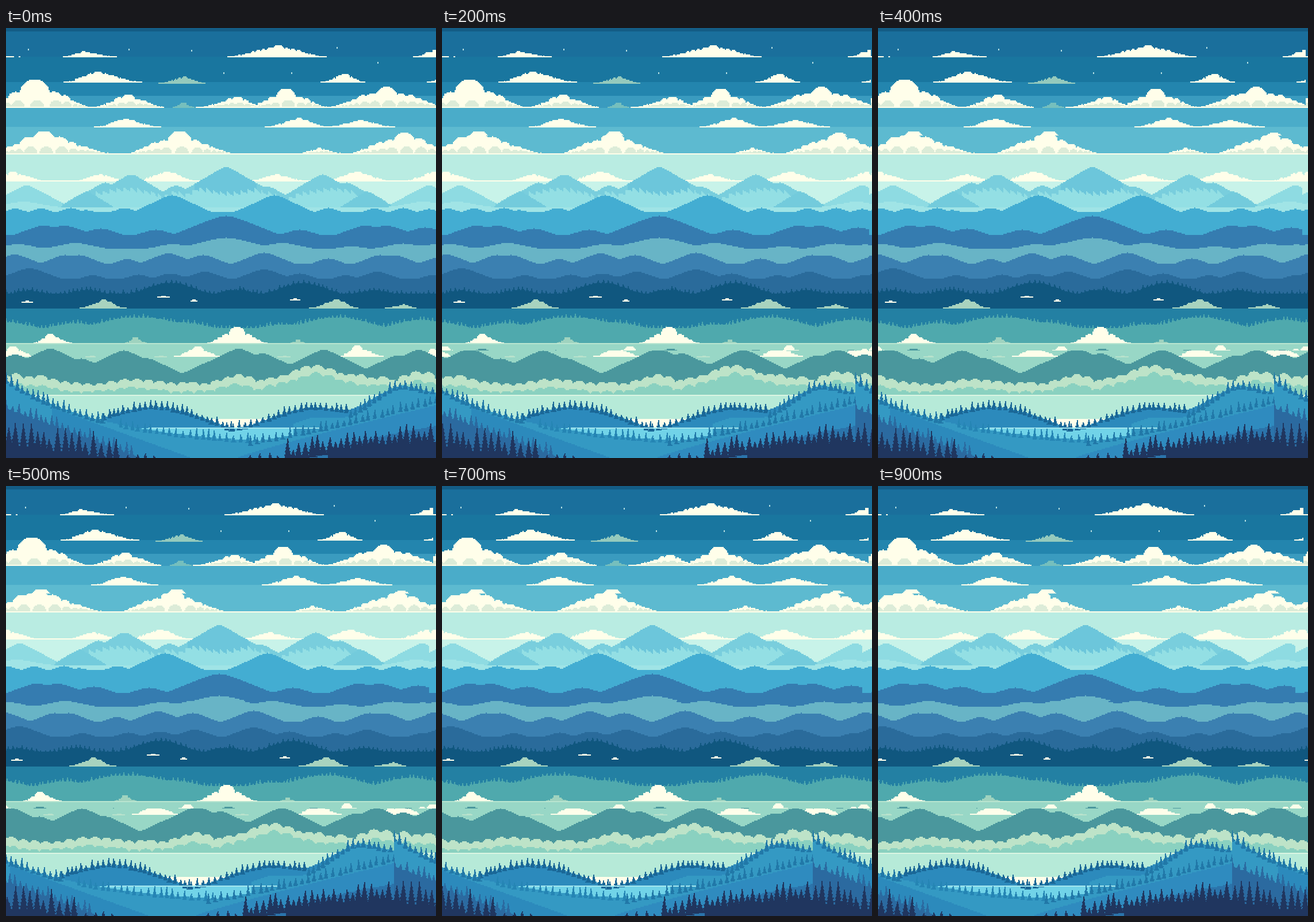
An HTML page with a canvas that plays this animation: 748x748 px, repeating every 1 s.

```html
<!DOCTYPE html>
<html>
<head>
<meta charset="utf-8">
<title>Parallax hills</title>
<style>
html, body { margin: 0; width: 100%; height: 100%; overflow: hidden; background: #1a6f9c; }
canvas { display: block; width: 100vw; height: 100vh; }
</style>
</head>
<body>
<canvas id="stage" width="748" height="748"></canvas>
<script>
const S = 748, P = 2, CREAM = '#fffeea', SHADE = '#dcecd8';
const view = document.getElementById('stage').getContext('2d');
const scene = document.createElement('canvas');
scene.width = scene.height = S;
const g = scene.getContext('2d');

let seed = 7;
const rnd = () => (seed = (seed * 16807) % 2147483647) / 2147483647;
const snap = v => Math.round(v / P) * P;

function box(color, x, y, w, h) {
  g.fillStyle = color;
  g.fillRect(Math.round(x), Math.round(y), Math.round(w), Math.round(h));
}

// Skyline of rounded tents standing on a base: peaks are x,top pairs
function peaks(base, slope, round, list) {
  const soft = 1.5;
  return x => {
    let sum = Math.exp(-base / soft);
    for (let i = 0; i < list.length; i += 2)
      sum += Math.exp(-(list[i + 1] + slope * (Math.hypot(x - list[i], round) - round)) / soft);
    return -soft * Math.log(sum);
  };
}

// Eased line through a few x,y pairs
const glide = p => x => {
  let i = 0;
  while (i < p.length - 4 && x > p[i + 2]) i += 2;
  const t = Math.min(1, Math.max(0, (x - p[i]) / (p[i + 2] - p[i])));
  return p[i + 1] + (p[i + 3] - p[i + 1]) * (t + t * t * (3 - 2 * t)) / 2;
};

const rise = (x0, y0, height, power) => x => y0 - height * Math.max(0, (x - x0) / (S - x0)) ** power;

function ridge(color, bottom, y, x0 = 0, x1 = S) {
  for (let x = snap(x0); x < x1; x += P) {
    const top = snap(y(x));
    if (top < bottom) box(color, x, top, P, bottom - top);
  }
}

function tree(color, x, foot, h, w) {
  for (let i = 0; i < h; i += P) {
    const half = Math.max(1, w / 2 * (i + 2) / h * (i % 6 < 4 ? 0.85 : 1.15));
    box(color, x - half, foot - h + i, 2 * half, P);
  }
}

function trees(color, y, x0, x1, gap, h, w) {
  for (let x = x0; x < x1; x += gap * (0.8 + 0.4 * rnd()))
    tree(color, x, y(x) + 4, h * (0.65 + 0.7 * rnd()), w);
}

function puff(color, cx, top, r, base) {
  for (let x = snap(cx - r); x < cx + r; x += P) {
    const d = x + 1 - cx;
    if (Math.abs(d) > r) continue;
    const y = snap(top + r - Math.sqrt(r * r - d * d));
    if (y < base) box(color, x, y, P, base - y);
  }
}

// A tall puff with smaller ones falling away to both ends of a flat line
function cloud(base, cx, top, x0, x1, color = CREAM, shaded = false) {
  const H = base - top, lobes = [[cx, H]];
  for (const end of [x0, x1]) {
    const side = Math.sign(end - cx);
    let x = cx, h = H;
    while (true) {
      x += side * Math.max(6, h * 0.66);
      const t = (x - cx) / (end - cx);
      if (t > 0.9) break;
      h = H * (1 - t) ** 1.2 * (0.9 + 0.2 * rnd());
      lobes.push([x, h]);
    }
  }
  for (const [x, h] of lobes) puff(color, x, base - h, Math.max(4, h * 0.52), base);
  if (shaded)
    for (const [x, h] of lobes) {
      const s = Math.min(12, h * 0.4);
      puff(SHADE, x + 4, base - 2 - s, s, base - 2);
    }
  box(color, x0, base - 2, x1 - x0, 2);
}

function clouds(base, list, color, shaded) {
  list.forEach(c => cloud(base, ...c, color, shaded));
}

function sky() {
  [[0, '#145d86'], [6, '#1a6f9c'], [50, '#19769f'], [94, '#2385ae'], [118, '#3a9bbf'],
   [139, '#4aacc9'], [172, '#5dbad0'], [220, '#b9ece2'], [266, '#c8f3e9']]
    .forEach(([y, c]) => box(c, 0, y, S, S - y));
  [[38, 36], [213, 36], [322, 38], [575, 33], [646, 59], [378, 77], [496, 77]]
    .forEach(([x, y]) => box('#b5dfe2', x, y, 2, 3));
  clouds(51, [[135, 40, 99, 193], [474, 29, 385, 558], [748, 37, 708, 770]]);
  box(CREAM, 0, 49, 14, 2);
  box(CREAM, 22, 49, 3, 2);
  clouds(95, [[160, 75, 100, 237], [590, 79, 547, 625], [748, 90, 732, 770]]);
  clouds(97, [[311, 84, 265, 347]], '#95cabd');
  clouds(139, [[50, 89, -40, 150], [213, 115, 150, 275], [403, 119, 330, 450],
    [487, 105, 420, 560], [662, 102, 555, 775]], CREAM, true);
  clouds(139, [[309, 129, 290, 328]], '#76bfbd');
  clouds(173, [[209, 157, 153, 270], [510, 156, 450, 560], [617, 159, 557, 677]]);
  clouds(220, [[66, 179, -40, 185], [302, 179, 205, 400], [545, 208, 500, 590], [693, 182, 590, 800]], CREAM, true);
  box(CREAM, 0, 218, S, 2);
  clouds(267, [[12, 249, -40, 70], [165, 254, 115, 215], [280, 249, 225, 335], [472, 254, 415, 525],
    [612, 249, 550, 670], [746, 249, 690, 800]]);
  box(CREAM, 0, 265, S, 2);
}

function mountains() {
  ridge('#8edbe2', 330, peaks(308, 0.56, 8, [35, 274, 735, 274]));
  const alps = peaks(309, 0.6, 6, [140, 285, 172, 269, 217, 255, 295, 274, 350, 263, 382, 242,
    420, 265, 455, 276, 550, 255, 592, 269, 627, 285]);
  ridge('#79cedd', 330, alps, 97, 662);
  ridge('#6cc6db', 300, alps, 328, 436);
  ridge('#93dfe4', 330, x => Math.max(alps(x) + 8, 281 + 4 * Math.sin(x / 19)) + x % 12 * 0.7, 150, 612);
  const spurs = peaks(330, 0.62, 4, [140, 285, 627, 285]);
  ridge('#73cbdc', 330, spurs);
  ridge('#a0e4e6', 330, peaks(312, 0.2, 10, [30, 302, 725, 302]));

  ridge('#43add2', 390, peaks(320, 0.5, 9, [15, 314, 60, 314, 112, 313, 138, 317, 205, 313, 288, 291,
    420, 313, 466, 291, 560, 313, 640, 314, 690, 313, 735, 315]));
  ridge('#357cb0', 400, peaks(361, 0.42, 16, [65, 344, 100, 344, 164, 349, 260, 351, 382, 327,
    510, 351, 625, 344, 660, 344, 728, 347]));
  ridge('#68b4c6', 425, peaks(384, 0.26, 15, [20, 376, 120, 374, 290, 376, 382, 365, 480, 374, 600, 380, 690, 375, 748, 376]));
  ridge('#3b80b1', 450, peaks(411, 0.43, 10, [14, 394, 102, 395, 126, 395, 210, 402, 282, 392, 342, 395,
    448, 391, 560, 401, 650, 395, 675, 395, 748, 400]));
  ridge('#2a6b9b', 480, peaks(437, 0.4, 10, [40, 418, 150, 430, 230, 429, 285, 427, 345, 424, 448, 420,
    510, 427, 590, 430, 645, 424, 740, 430]));
  const wood = peaks(462, 0.42, 25, [40, 457, 140, 456, 285, 443, 400, 455, 515, 444, 640, 456]);
  ridge('#10577f', 488, wood);
  trees('#10577f', wood, 0, S, 8, 8, 7);
}

function lowland() {
  [[37, 478, 10], [274, 469, 11], [327, 476, 6], [503, 474, 9]]
    .forEach(([x, y, r]) => cloud(y, x, y - 4, x - r, x + r));
  clouds(488, [[170, 472, 128, 210], [575, 471, 527, 613], [692, 480, 659, 714]], '#a8d3bf');

  box('#2380a3', 0, 488, S, 62);
  const shore = peaks(523, 0.3, 30, [0, 512, 120, 514, 215, 504, 245, 504, 310, 513, 480, 516, 574, 503, 722, 508]);
  ridge('#4fa9ad', 550, shore);
  trees('#4fa9ad', shore, 0, S, 7, 8, 6);
  clouds(549, [[225, 537, 207, 245], [508, 541, 495, 520]], '#9fd3bf');
  clouds(549, [[77, 531, 48, 115], [402, 520, 350, 455]]);

  box('#98d7c6', 0, 550, S, 90);
  box('#b9e5d0', 0, 548, S, 2);
  clouds(573, [[150, 569, 138, 156], [270, 569, 258, 280], [485, 569, 472, 495]], '#b8e2cc');
  clouds(572, [[12, 553, -25, 51], [334, 553, 292, 374], [611, 552, 580, 657], [742, 558, 722, 770]]);
  ridge('#4a979d', 630, peaks(607, 0.5, 8, [15, 568, 76, 558, 130, 575, 204, 561, 245, 575, 350, 583,
    404, 558, 445, 566, 552, 560, 679, 570, 717, 560]));

  const mist = peaks(617, 0.4, 15, [15, 602, 60, 605, 215, 609, 245, 611, 400, 603, 480, 604, 537, 586, 600, 601, 650, 606, 720, 598]);
  for (const [color, drop] of [['#bde3c8', 0], ['#8ad1c0', 14]]) {
    ridge(color, 638, x => mist(x) + drop + 5);
    for (let x = 0; x < S + 20; x += 17 + 6 * rnd())
      puff(color, x, mist(x) + drop + 4 * rnd() - 2, 10 + 4 * rnd(), 638);
  }
  box('#b6ead8', 0, 638, S, 110);
  box('#daf5e2', 0, 638, S, 2);
}

function hills() {
  box(CREAM, 325, 680, 140, 16);
  box('#71d3e8', 180, 696, 400, 52);

  const back = peaks(700, 0.42, 60, [255, 659]);
  ridge('#2c8abc', 696, back, 110, 392);
  trees('#1a6797', back, 170, 400, 9, 13, 8);
  const east = glide([390, 698, 530, 659, 592, 665, 687, 622, 748, 634]);
  ridge('#2c8abc', 696, east, 392);
  trees('#1a6797', east, 395, 600, 9, 13, 8);
  const crest = x => east(x) + Math.max(0, 690 - x) * 0.12;
  ridge('#3499c3', 748, crest, 500);
  trees('#2178a8', crest, 600, S, 9, 15, 8);
  box('#a4e6ee', 248, 695, 297, 2);

  const west = x => 728 - 114 * Math.exp(-x / 180);
  ridge('#3499c3', 748, west, 0, 470);
  trees('#2178a8', west, 0, 170, 9, 15, 8);
  trees('#2585b4', west, 200, 450, 11, 14, 7);
  ridge('#2c8abc', 748, x => 632 + 0.36 * x, 80, 320);

  const slope = rise(400, 724, 76, 1.2);
  ridge('#3499c3', 748, slope, 400);
  trees('#2178a8', slope, 425, S, 11, 13, 7);
  ridge('#2f8bbf', 748, rise(400, 748, 92, 0.9), 400);
  ridge('#2b74ab', 748, rise(520, 750, 58, 0.7), 520);

  const near = x => 662 + 0.37 * x;
  ridge('#2b6aa0', 748, near, 0, 235);
  trees('#2b6aa0', near, 0, 225, 10, 18, 9);

  const navy = '#20365f';
  const left = x => 724 + 0.14 * x, right = rise(500, 750, 30, 0.6);
  ridge(navy, 748, left, 0, 170);
  trees(navy, left, 5, 195, 12, 36, 15);
  ridge(navy, 748, right, 560);
  trees(navy, right, 490, S, 11, 30, 15);
  trees(navy, () => 748, 212, 260, 16, 10, 9);
  trees(navy, () => 748, 425, 480, 16, 11, 9);
}

sky();
mountains();
lowland();
hills();

const SPEEDS = [0.9, 2.44, 3.66, 14.65], BAND = S / 4;

function frame(now) {
  const step = Math.floor(now % 1000 / 100);
  SPEEDS.forEach((v, i) => {
    const dx = Math.round(v * step), y = i * BAND;
    for (const x of [-dx, S - dx]) view.drawImage(scene, 0, y, S, BAND, x, y, S, BAND);
  });
  requestAnimationFrame(frame);
}
frame(0);
</script>
</body>
</html>
```
